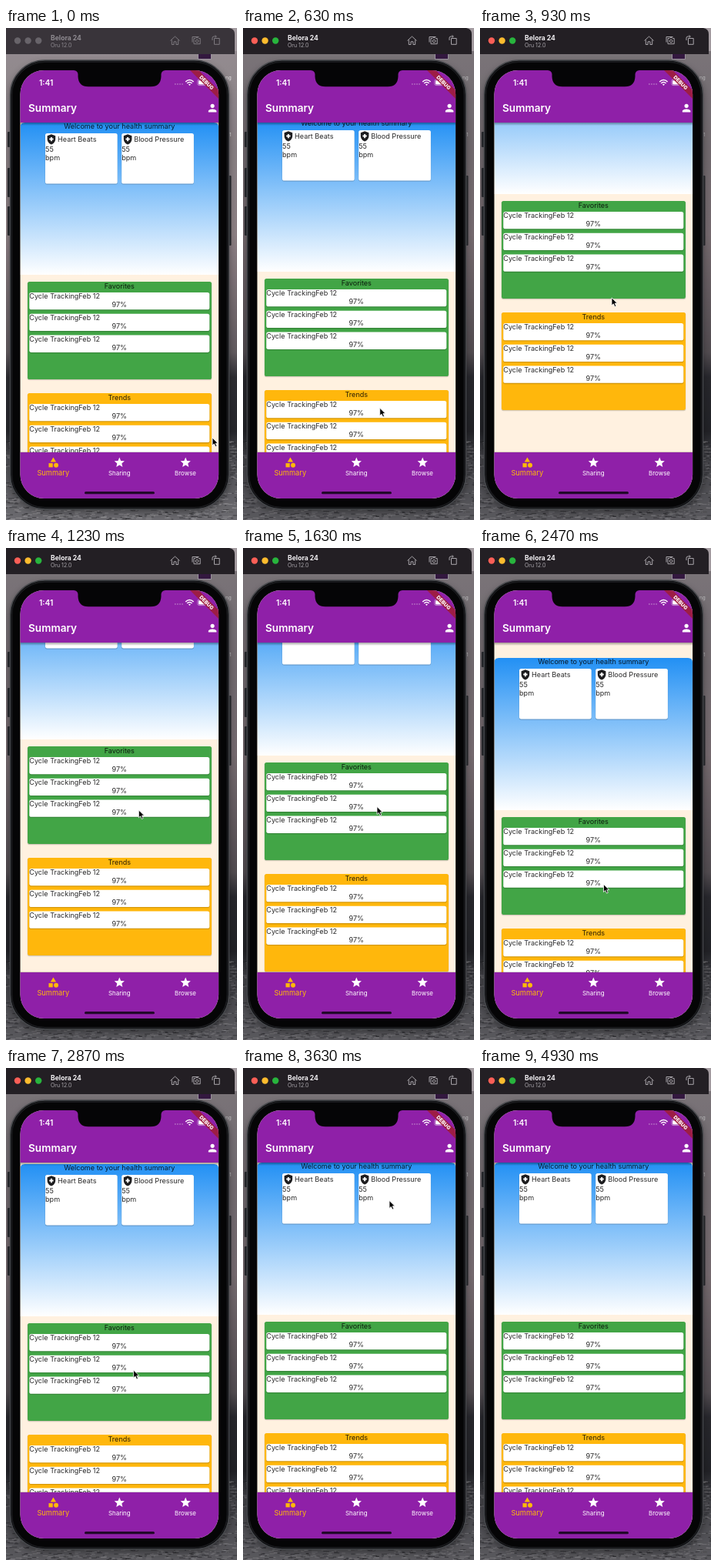
An HTML page for the animation above (4.96 s loop, 300 px wide and 640 px high).

```html
<!DOCTYPE html>
<html lang="en">
<head>
<meta charset="utf-8">
<title>Health summary</title>
<style>
  html, body { margin: 0; width: 100%; height: 100%; overflow: hidden; background: #2b2a30; }
  svg { display: block; width: 300px; height: 640px; font-family: Inter, Roboto, sans-serif; }
  .body { font-size: 9.1px; fill: #000; fill-opacity: .84; }
  .mid { text-anchor: middle; }
  .tab { font-size: 7.95px; fill: #fff; text-anchor: middle; }
  .tools { fill: none; stroke: #a9a6ab; stroke-width: 1; }
  .idle .tools { stroke: #7d797f; }
  .bar { fill: #231f24; }
  .idle .bar { fill: #39343a; }
  .name { font-size: 8.6px; font-weight: 700; fill: #f4f2f5; }
  .version { font-size: 7px; fill: #aaa6ac; }
  .idle .name, .idle .version { fill: #8f8b91; }
  .idle .light { fill: #68646a; }
  .idle .dim { opacity: .1; }
</style>
</head>
<body>
<svg id="stage" class="idle" viewBox="0 0 300 640">
  <defs>
    <linearGradient id="wall" x1="0" y1="0" x2="0" y2="1">
      <stop offset="0" stop-color="#a59da2"/>
      <stop offset=".25" stop-color="#968c91"/>
      <stop offset=".42" stop-color="#9c8d92"/>
      <stop offset=".66" stop-color="#6c6469"/>
      <stop offset=".71" stop-color="#323238"/>
      <stop offset=".82" stop-color="#2a2b30"/>
      <stop offset=".87" stop-color="#55555a"/>
      <stop offset="1" stop-color="#77767b"/>
    </linearGradient>
    <linearGradient id="sky" x1="0" y1="0" x2="0" y2="1">
      <stop offset="0" stop-color="#2290f4"/>
      <stop offset="1" stop-color="#fff"/>
    </linearGradient>
    <linearGradient id="fall" x1="0" y1="0" x2="0" y2="1">
      <stop offset="0" stop-color="#000" stop-opacity=".36"/>
      <stop offset="1" stop-color="#000" stop-opacity="0"/>
    </linearGradient>
    <filter id="soft" x="-20%" y="-10%" width="140%" height="120%"><feGaussianBlur stdDeviation="5"/></filter>
    <clipPath id="screen"><rect x="18.5" y="55" width="257.6" height="557" rx="31"/></clipPath>
    <clipPath id="view"><rect x="18.5" y="123" width="257.6" height="429"/></clipPath>
    <path id="star" d="M12 17.27L18.18 21l-1.64-7.03L22 9.24l-7.19-.61L12 2 9.19 8.63 2 9.24l5.46 4.73L5.82 21z"/>
    <path id="shield" fill-rule="evenodd" d="M10.5 13H8v-3h2.5V7.5h3V10H16v3h-2.5v2.5h-3V13zM12 2L4 5v6.09c0 5.05 3.41 9.76 8 10.91 4.59-1.15 8-5.86 8-10.91V5l-8-3z"/>
  </defs>

  <!-- desktop -->
  <rect width="300" height="640" fill="url(#wall)"/>
  <g id="water"></g>
  <g font-size="6.5" fill="#fff">
    <text x="285" y="67">ng</text>
    <text x="290" y="141">1</text>
  </g>
  <rect class="dim" y="30" width="300" height="610" fill="#0c0c12" opacity=".27"/>
  <rect x="5" y="46" width="285" height="584" rx="45" opacity=".35" filter="url(#soft)"/>
  <rect x="249.5" y="30" width="17" height="10.5" fill="#33183f" stroke="#aaa5ad" stroke-width=".8"/>

  <!-- window bar -->
  <path class="bar" d="M0 0H290Q297 1 297 8V34H0Z"/>
  <circle class="light" cx="15" cy="16.5" r="4.2" fill="#fc5f57"/>
  <circle class="light" cx="28.6" cy="16.5" r="4.2" fill="#fdbc2e"/>
  <circle class="light" cx="42.2" cy="16.5" r="4.2" fill="#28b53d"/>
  <text class="name" x="58" y="15.6">Belora 24</text>
  <text class="version" x="58" y="24.6">Oru 12.0</text>
  <g class="tools">
    <path d="M213.5 16.5L219.5 11L225.5 16.5M215.3 15.5V21.5H218V17.8H221V21.5H223.7V15.5"/>
    <path d="M242 18.5V11.5H250.5M244 13.5H246L246.8 12.7H249.4L250.2 13.5H252.2V20.7H244Z"/>
    <circle cx="248.1" cy="17" r="1.8"/>
    <path d="M270.5 13.5H277.2V21.3H270.5ZM268 16V13Q268 11 270 11H273M271.6 9.5L273.3 11L271.6 12.6"/>
  </g>

  <!-- phone -->
  <g fill="#25262a">
    <rect x="2" y="135" width="5" height="20" rx="1"/>
    <rect x="2" y="182" width="5" height="38" rx="1"/>
    <rect x="2" y="232" width="5" height="38" rx="1"/>
    <rect x="287" y="192" width="5.5" height="91" rx="1"/>
  </g>
  <rect x="5.5" y="42" width="284" height="584" rx="45" fill="#050506" stroke="#46484c" stroke-width="1.5"/>
  <rect x="7.6" y="44.1" width="279.8" height="579.8" rx="43" fill="none" stroke="#1a1b1e" stroke-width="1.6"/>

  <g clip-path="url(#screen)">
    <rect x="18" y="55" width="259" height="557" fill="#fff1e0"/>
    <g clip-path="url(#view)">
      <g id="page">
        <path d="M18.5 321V129Q18.5 123 24.5 123H270.1Q276.1 123 276.1 129V321Z" fill="url(#sky)"/>
        <text class="body mid" x="147.3" y="131.4">Welcome to your health summary</text>
      </g>
      <rect x="18" y="123" width="259" height="4" fill="url(#fall)"/>
    </g>

    <!-- app bar -->
    <rect x="18" y="55" width="259" height="68" fill="#8f20a8"/>
    <text x="29" y="109" font-size="13.6" font-weight="600" fill="#fff">Summary</text>
    <path transform="translate(260.2 96.2) scale(.66)" fill="#fff" d="M12 12c2.21 0 4-1.79 4-4s-1.79-4-4-4-4 1.79-4 4 1.79 4 4 4zm0 2c-2.67 0-8 1.34-8 4v2h16v-2c0-2.66-5.33-4-8-4z"/>
    <text x="43" y="75" font-size="10.2" font-weight="600" fill="#fff">1:41</text>
    <path d="M219 73H230" stroke="#b673c5" stroke-width="1.5" stroke-dasharray="1.6 1.5"/>
    <g fill="none" stroke="#fff" stroke-width="1.5">
      <path d="M233.2 70Q238.4 65 243.6 70M235.2 72Q238.4 69 241.6 72"/>
    </g>
    <path d="M236.8 73.3Q238.4 72 240 73.3L238.4 75Z" fill="#fff"/>
    <rect x="248.8" y="67" width="14" height="7.6" rx="2.2" fill="none" stroke="#d9b3e1" stroke-width=".7"/>
    <rect x="250" y="68.2" width="11.6" height="5.2" rx="1.2" fill="#fff"/>
    <path d="M264 69.6V72" stroke="#d9b3e1" stroke-width="1"/>
    <g transform="translate(276.5 55) rotate(45)">
      <rect x="-27" y="18.5" width="54" height="8" fill="#a01d38" fill-opacity=".88"/>
      <text class="mid" y="24.9" font-size="6.6" font-weight="800" fill="#fff">DEBUG</text>
    </g>

    <!-- tab bar -->
    <rect x="18" y="551" width="259" height="1" fill="#000" opacity=".16"/>
    <rect x="18" y="552" width="259" height="60" fill="#8f20a8"/>
    <g transform="translate(53.5 557.2) scale(.66)" fill="#ffb908">
      <path d="M12 2l-5.5 9h11z"/>
      <circle cx="17.5" cy="17.5" r="4.5"/>
      <rect x="3" y="13.5" width="8" height="8"/>
    </g>
    <use href="#star" transform="translate(139.4 557.2) scale(.66)" fill="#fff"/>
    <use href="#star" transform="translate(225.3 557.2) scale(.66)" fill="#fff"/>
    <text class="mid" x="61.3" y="581.8" font-size="9.3" fill="#ffb908">Summary</text>
    <text class="tab" x="147.3" y="581.6">Sharing</text>
    <text class="tab" x="233" y="581.6">Browse</text>
    <rect x="102" y="603" width="91" height="3.3" rx="1.65" fill="#22082a"/>
  </g>
  <path d="M88 54V55Q93 55.3 93.5 60V63Q94 76.3 107 76.3H188Q201 76.3 201.5 63V60Q202 55.3 207 55V54Z" fill="#050506"/>

  <path id="cursor" d="M0 0V10L2.3 7.9L4 11.6L5.8 10.8L4.2 7.2H7.3Z" fill="#000" stroke="#fff" stroke-width=".8" stroke-linejoin="round"/>
</svg>
<script>
const LOOP = 4960, FOCUS = 600, EXIT = 4270;
const $ = id => document.getElementById(id);
const stage = $('stage'), page = $('page'), cursor = $('cursor');

function add(parent, tag, attrs, text) {
  const el = document.createElementNS('http://www.w3.org/2000/svg', tag);
  for (const key in attrs) el.setAttribute(key, attrs[key]);
  if (text) el.textContent = text;
  parent.appendChild(el);
}
const label = (x, y, text, cls = 'body') => add(page, 'text', { x, y, class: cls }, text);

function box(x, y, width, height, fill) {
  add(page, 'rect', { x: x - .3, y: y + .4, width: width + .6, height: height + .9, rx: 2.7, fill: '#000', 'fill-opacity': .17 });
  add(page, 'rect', { x, y, width, height, rx: 2.6, fill });
}

function metric(x, title) {
  box(x, 137, 93.7, 65.5, '#fff');
  add(page, 'use', { href: '#shield', transform: `translate(${x} 137) scale(.66)`, fill: '#1d1d1f' });
  label(x + 16, 147.9, title);
  label(x, 161.3, '55');
  label(x, 172.3, 'bpm');
}

function section(y, title, color) {
  box(28, y, 239, 127, color);
  label(147.3, y + 8.7, title, 'body mid');
  for (let i = 0; i < 3; i++) {
    const top = y + 14 + i * 27.8;
    box(30.3, top, 234, 22.3, '#fff');
    label(30.3, top + 8.4, 'Cycle TrackingFeb 12');
    label(147.3, top + 19.4, '97%', 'body mid');
  }
}

metric(51, 'Heart Beats');
metric(150.2, 'Blood Pressure');
section(330, 'Favorites', '#42a546');
section(475, 'Trends', '#ffb70c');

// ripples on the water, from a seeded generator
let seed = 7;
const rand = () => (seed = seed * 16807 % 2147483647) / 2147483647;
for (let i = 0; i < 1600; i++) {
  add($('water'), 'rect', {
    x: rand() * 304 - 4, y: 535 + rand() * 105, width: 2 + rand() * 6, height: 1,
    fill: rand() < .5 ? '#1f1f24' : '#b4b3b7', opacity: .55
  });
}

const scrollKeys = [
  [0, 0], [590, 0], [930, -105], [1000, -107], [1250, -70], [1540, -51], [1650, -51],
  [2030, 27.4], [2150, 33], [2300, 33], [2470, 20], [2700, 6], [2950, 1], [3200, 0], [LOOP, 0]
];
const cursorKeys = [
  [0, 268, 533], [540, 178, 500], [590, 178, 500], [930, 171, 351], [1000, 171, 348],
  [1500, 174, 336.5], [1650, 174, 336.5], [2030, 161.5, 427.5], [2300, 160.5, 437.5],
  [2700, 160.5, 437.5], [3200, 183, 240], [3600, 190, 172.5], [3770, 190, 172.5], [EXIT, 302, 40]
];

// monotone cubic through the keys
function track(keys, col, t) {
  const last = keys.length - 1;
  if (t >= keys[last][0]) return keys[last][col];
  let i = 0;
  while (t >= keys[i + 1][0]) i++;
  const slope = k => k < 0 || k >= last ? 0
    : (keys[k + 1][col] - keys[k][col]) / (keys[k + 1][0] - keys[k][0]);
  const tangent = k => {
    const a = slope(k - 1), b = slope(k);
    return a * b <= 0 ? 0 : 2 * a * b / (a + b);
  };
  const span = keys[i + 1][0] - keys[i][0], u = (t - keys[i][0]) / span, v = 1 - u;
  return keys[i][col] * v * v * (1 + 2 * u) + keys[i + 1][col] * u * u * (3 - 2 * u)
    + span * u * v * (tangent(i) * v - tangent(i + 1) * u);
}

function draw() {
  const t = performance.now() % LOOP;
  stage.classList.toggle('idle', t < FOCUS);
  page.setAttribute('transform', `translate(0 ${track(scrollKeys, 1, t).toFixed(2)})`);
  cursor.setAttribute('transform', `translate(${track(cursorKeys, 1, t).toFixed(2)} ${track(cursorKeys, 2, t).toFixed(2)})`);
  cursor.setAttribute('visibility', t < EXIT ? 'visible' : 'hidden');
  requestAnimationFrame(draw);
}
draw();
</script>
</body>
</html>
```
